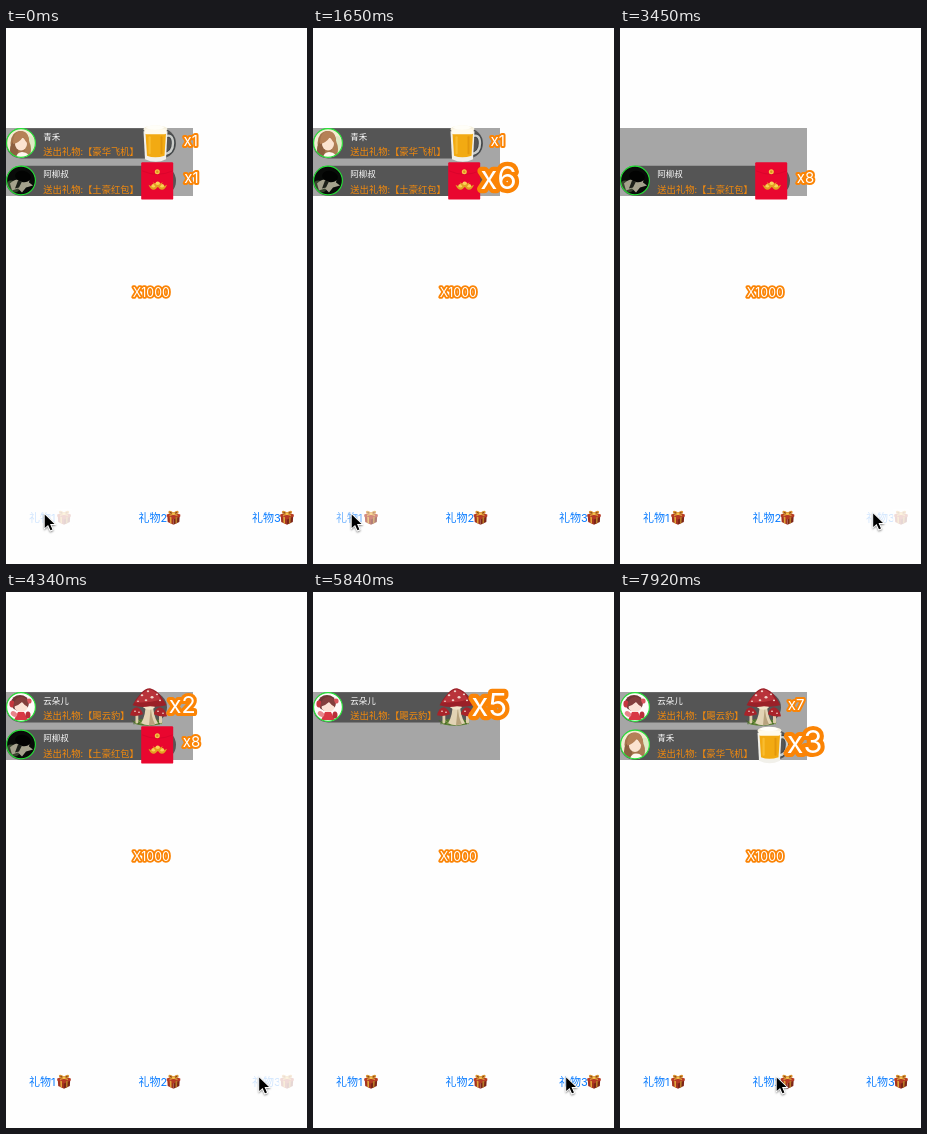
An HTML page with a canvas for the animation above (8 s loop, 301 by 536 pixels).

```html
<!DOCTYPE html>
<html lang="zh">
<head>
<meta charset="utf-8">
<title>礼物动画</title>
<style>
html, body { margin: 0; width: 100%; height: 100%; overflow: hidden; background: #fefefe; }
canvas { display: block; width: 301px; height: 536px; }
</style>
</head>
<body>
<canvas id="stage"></canvas>
<script>
const W = 301, H = 536, LOOP = 8000, STEP = 150;
const BASES = [0, 4340, 6580, 7770];
const CJK = '"Noto Sans CJK SC", "Noto Sans CJK", "Noto Sans", sans-serif';
const LATIN = 'Inter, Roboto, sans-serif';
const ORANGE = '#fb8405';

const canvas = document.getElementById('stage');
const ratio = window.devicePixelRatio || 1;
canvas.width = W * ratio;
canvas.height = H * ratio;
const c = canvas.getContext('2d');

const clamp = (v) => Math.max(0, Math.min(1, v));
const ease = (v) => v * v * (3 - 2 * v);
const part = (t, a, b) => clamp((t - a) / (b - a));

function at(x, y, draw, scale = 1) {
  c.save();
  c.translate(x, y);
  c.scale(scale, scale);
  draw();
  c.restore();
}
function oval(x, y, rx, ry, fill, turn = 0) {
  c.beginPath();
  c.ellipse(x, y, rx, ry, turn, 0, 7);
  c.fillStyle = fill;
  c.fill();
}
function box(x, y, w, h, fill, r = 0) {
  c.beginPath();
  c.roundRect(x, y, w, h, r);
  c.fillStyle = fill;
  c.fill();
}
function shape(d, fill, stroke, width = 1) {
  const p = new Path2D(d);
  if (fill) { c.fillStyle = fill; c.fill(p); }
  if (stroke) { c.strokeStyle = stroke; c.lineWidth = width; c.stroke(p); }
}
function label(s, x, y, size, color, font = CJK) {
  c.font = `${size}px ${font}`;
  c.fillStyle = color;
  c.fillText(s, x, y);
}
function outlined(s, size, width) {
  c.font = `${size}px ${LATIN}`;
  c.textAlign = 'center';
  c.lineJoin = 'round';
  c.lineWidth = width;
  c.strokeStyle = ORANGE;
  c.strokeText(s, 0, size * 0.365);
  c.fillStyle = '#fff';
  c.fillText(s, 0, size * 0.365);
}

// Avatars, centred on the origin
const faces = {
  brown() {
    oval(0, 0, 15, 15, '#f3ecd2');
    oval(9, 2, 6, 9, '#dfe9c4');
    oval(-1, 0, 9.5, 12, '#a4744c');
    oval(-7, 7, 4, 8, '#8d6040');
    oval(7, 6, 3, 7, '#ab7d55');
    oval(0, 1, 6, 6.5, '#fbe3d0');
    shape('M-8 1Q-8 -12 1 -12Q9 -11 8 2Q4 -2 2 -6Q-2 0 -8 1Z', '#b58157');
    shape('M-5 15Q-4 9 1 9Q7 9 9 15Z', '#fff7ee');
  },
  dark() {
    oval(0, 0, 15, 15, '#090b09');
    oval(-8, 6, 7, 5, '#39452f', 0.7);
    shape('M-11 3Q-5 -3 1 0L9 -4L8 2L12 5L5 7L1 12L-3 8L-9 10Z', '#a5a28d');
    oval(2, -4, 8, 5.5, '#020302', 0.2);
    shape('M-3 0L1 1L-2 7L-6 8Z', '#1d211a');
  },
  red() {
    oval(0, 0, 15, 15, '#fffafa');
    oval(-1, -4, 9, 8, '#713636');
    oval(-9, -3, 2.6, 3.4, '#c7373f');
    oval(8, -6, 2.6, 2.6, '#d8555c');
    oval(0, 0, 6.5, 5, '#fce2d6');
    shape('M-8 0Q-6 -11 1 -10Q8 -9 7 0Q3 -2 1 -5Q-3 -1 -8 0Z', '#833f3d');
    shape('M-3 5L3 5L7 13L-7 13Z', '#d93845');
    oval(-7, 7, 3.5, 2.5, '#e8838a', 0.6);
    oval(7, 8, 2.5, 3.5, '#b92e3a');
  }
};

// Gifts, positioned relative to the top left of the row
const gifts = {
  beer() {
    shape('M159 8Q167 5 167 15Q167 25 158 26', null, '#3f4548', 4.2);
    shape('M159 8Q167 5 167 15Q167 25 158 26', null, '#c9cbc8', 2.4);
    shape('M137.500 3L161.500 3L160 31Q150 36 139 31Z', '#f1f0ea');
    shape('M139.500 5L160 5L158.500 27.500Q149 30.500 141 27.500Z', '#f2aa12');
    box(142.5, 8, 2.2, 18, '#f9bd30', 1);
    box(154.5, 8, 2, 18, '#e3970c', 1);
    oval(149.5, 1, 12, 3.8, '#f7f2e0');
    box(138.5, 1, 22, 5, '#fffbed', 2);
    oval(149, -0.8, 9, 2.2, '#fffef8');
  },
  packet() {
    box(135.2, -3.5, 32, 37.3, '#e9062f', 1.2);
    shape('M136 5Q151 12 167 5', null, '#d0052a', 0.6);
    oval(151.3, 6, 2.5, 2.5, '#f6c544');
    oval(151.3, 6, 1.2, 1.2, '#d99122');
    for (const [x, y] of [[147.5, 21], [156, 21], [151.7, 18.5]]) {
      shape(`M${x - 5} ${y - 2}Q${x} ${y + 1} ${x + 5} ${y - 2}Q${x + 3} ${y + 3} ${x} ${y + 3}Q${x - 3} ${y + 3} ${x - 5} ${y - 2}Z`, '#e2a022');
      oval(x, y - 1, 2.2, 1.8, '#fbd254');
    }
  },
  mushroom() {
    oval(142, 30, 14, 3.5, '#587c32');
    for (let i = 0; i < 14; i++) {
      const x = 128 + i * 2.1, h = (i * 5) % 5;
      shape(`M${x} 32Q${x + 1} ${30 - h} ${x + (i % 3 - 1) * 2} ${28 - h}`, null, i % 2 ? '#7e9c43' : '#426323', 0.9);
    }
    shape('M139.500 11L147 11Q147 23 152 31Q143 35 135 31Q140 23 139.500 11Z', '#e2d3b4');
    shape('M145 13Q145 25 149 32L143 33Z', '#b7a27c');
    shape('M137 15Q144 20 149 15L147 11L139 11Z', '#f1e5ca');
    box(129.5, 21, 2.8, 10, '#ddcdac', 1);
    box(153, 22, 3, 9, '#ddcdac', 1);
    shape('M124 23Q126 15 131 15Q136 17 137 22Q130 25 124 23Z', '#a9232a');
    shape('M148 22Q149 16 154 15Q160 17 161 24Q154 25 148 22Z', '#a9232a');
    shape('M126.500 13Q130 6 135 1Q139 -4 144 -4Q151 -2 155 4Q158 8 160.500 13Q152 15 144 14Q135 16 126.500 13Z', '#9b2028');
    shape('M129 10Q137 -2 143 -3Q150 -2 155 7Q143 11 129 10Z', '#b9333a');
    for (const [x, y, r] of [[136, 3, 1.3], [142, -1, 1.2], [146, 5, 1.5], [151, 2, 1.1],
      [140, 8, 1.3], [154, 8, 1.1], [132, 9, 1], [129, 19, 0.9], [133, 20, 0.9], [152, 19, 1], [157, 21, 0.9]]) {
      oval(x, y, r, r * 0.8, '#f0d3ca');
    }
  }
};

const kinds = {
  beer: { name: '青禾', gift: '豪华飞机', face: 'brown', width: 170, mid: 184.7 },
  packet: { name: '阿柳叔', gift: '土豪红包', face: 'dark', width: 170, mid: 185.5 },
  mushroom: { name: '云朵儿', gift: '飓云豹', face: 'red', width: 161, mid: 176.2 }
};

// Each row: when it slides in and out, and when its counter goes up
const rows = [
  { kind: 'beer', y: 100.3, from: -1000, to: 2480, hits: [-800] },
  { kind: 'mushroom', y: 100.3, from: 3640, to: 9900, hits: [3830, 4290, 4645, 5110, 5740, 6040, 6340] },
  { kind: 'packet', y: 137.8, from: -1000, to: 5560, hits: [-600, 350, 650, 950, 1250, 1550, 1850, 2150] },
  { kind: 'beer', y: 137.8, from: 6300, to: 9900, hits: [6460, 7000, 7825] }
];

const buttons = [
  { x: 23, hits: [-50, 250, 550, 850, 1150, 1450, 1750] },
  { x: 132.5, hits: [6250, 6500, 7550] },
  { x: 246, hits: [3400, 3850, 4300, 4600, 4900, 5200, 5500] }
];

function pop(ms) {
  if (ms < 150) return 1 + ms * 0.011;
  if (ms < 240) return 2.65 - 1.75 * part(ms, 150, 240);
  return 0.9 + 0.1 * part(ms, 240, 300);
}

function drawRow(row, t) {
  if (t < row.from || t >= row.to + 270) return;
  const k = kinds[row.kind];
  const enter = 1 - part(t, row.from, row.from + 180);
  const leave = part(t, row.to, row.to + 270);
  at(W * leave * leave - k.width * ease(enter), row.y, () => {
    box(0, 0, k.width, 30.2, '#555', 15);
    at(15, 14.7, () => {
      c.save();
      c.beginPath();
      c.arc(0, 0, 14.5, 0, 7);
      c.clip();
      faces[k.face]();
      c.restore();
      c.beginPath();
      c.arc(0, 0, 14.4, 0, 7);
      c.lineWidth = 1.1;
      c.strokeStyle = '#25e337';
      c.stroke();
    });
    label(k.name, 37.3, 11.6, 8.5, '#fff');
    label(`送出礼物:【${k.gift}】`, 37.3, 26.7, 9.3, '#f48a0c');
    gifts[row.kind]();
    const done = row.hits.filter((h) => h <= t);
    if (done.length) {
      at(k.mid, 11.9, () => outlined('x' + done.length, 15, 4), pop(t - done[done.length - 1]));
    }
  });
}

function drawBox() {
  shape('M0.800 5L7 7.500L7 14.300L1.200 11.500Z', '#a3321f');
  shape('M13.200 5L7 7.500L7 14.300L12.800 11.500Z', '#7c2417');
  shape('M0.200 4L7 1.800L13.800 4L13.800 6L7 9L0.200 6Z', '#b53a25');
  shape('M3.200 6L5 6.800L5 13.300L3.500 12.600Z', '#e0a43a');
  shape('M10.800 6L9 6.800L9 13.300L10.500 12.600Z', '#b87a26');
  shape('M3 5L10 2.700M11 5L4 2.700', null, '#e0a43a', 1.3);
  oval(4.4, 2.2, 2.7, 1.6, '#d99330', 0.4);
  oval(9.6, 2.2, 2.7, 1.6, '#d99330', -0.4);
  oval(4.4, 2.2, 1.2, 0.6, '#7d3c18', 0.4);
  oval(9.6, 2.2, 1.2, 0.6, '#7d3c18', -0.4);
  oval(7, 3.2, 1.4, 1.2, '#f3c04f');
}

function drawButton(b, i, t) {
  const last = b.hits.filter((h) => h <= t).pop();
  const alpha = last === undefined ? 1 : 0.18 + 0.82 * part(t - last, 100, 300);
  c.save();
  c.globalAlpha = alpha;
  label('礼物', b.x, 494, 11, '#0a7cff');
  label(String(i + 1), b.x + 22, 494, 11, '#0a7cff', LATIN);
  // Overlapping parts fade together through a light veil
  c.globalAlpha = 1;
  at(b.x + 28, 482.5, drawBox);
  box(b.x + 27, 481.5, 16.5, 16.5, `rgba(254,254,254,${1 - alpha})`);
  c.restore();
}

function drawCursor(t) {
  const a = ease(part(t, 2080, 3150));
  const b = ease(part(t, 5880, 6230));
  const d = ease(part(t, 6750, 7600));
  const x = 38.5 + 214.5 * a - 92 * b - 4.5 * d;
  const y = 486 - a + 4 * Math.sin(Math.PI * a);
  c.save();
  c.shadowColor = 'rgba(0,0,0,.35)';
  c.shadowBlur = 2 * ratio;
  c.shadowOffsetY = ratio;
  at(x, y, () => shape('M0 0L0 14.500L3.400 11.400L5.800 17L8.500 15.800L6.100 10.400L10.600 10.400Z', '#fff', '#fff', 1.2));
  c.restore();
  at(x, y, () => shape('M0.200 0.600L0.200 14L3.600 10.900L6 16.300L7.900 15.400L5.500 10L10 10Z', '#000'));
}

function render(ms) {
  const base = BASES.filter((b) => b <= ms).pop();
  const t = base + Math.floor((ms - base) / STEP) * STEP;
  c.setTransform(ratio, 0, 0, ratio, 0, 0);
  c.textAlign = 'left';
  box(0, 0, W, H, '#fefefe');
  box(0, 100, 187, 68, '#a6a6a6');
  rows.forEach((row) => drawRow(row, t));
  at(145.3, 264.8, () => outlined('X1000', 12.4, 3.6));
  buttons.forEach((b, i) => drawButton(b, i, t));
  drawCursor(t);
}

const start = performance.now();
function loop() {
  render((performance.now() - start) % LOOP);
  requestAnimationFrame(loop);
}
loop();
</script>
</body>
</html>
```
